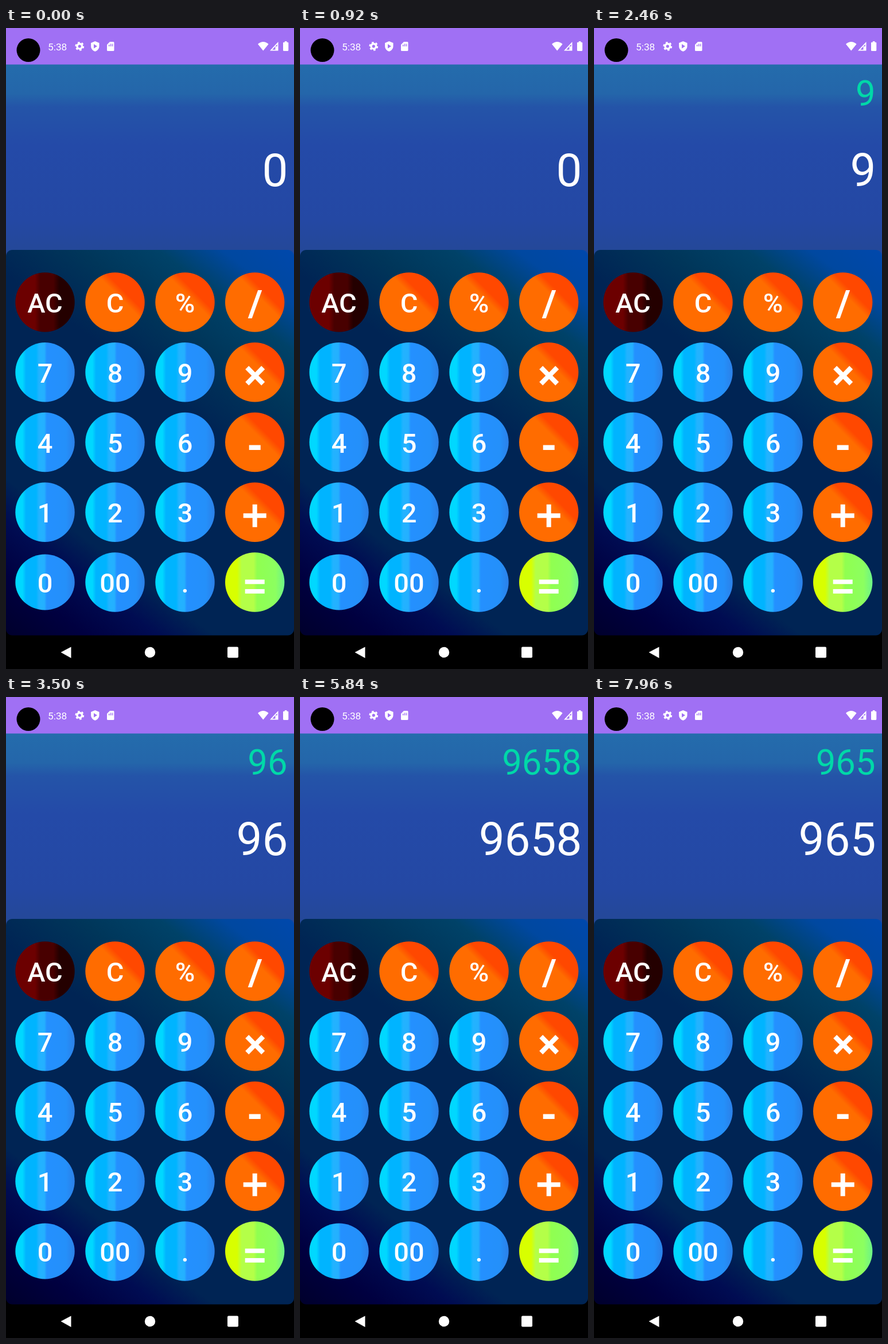
An HTML page for the animation above (8000 ms loop, 502x1115 px).

```html
<!DOCTYPE html>
<html lang="en">
<head>
<meta charset="utf-8">
<title>Calculator</title>
<style>
  html, body { margin: 0; width: 100%; height: 100%; overflow: hidden; background: #000; }
  svg { display: block; width: 100%; height: 100%; }
  text { font-family: Roboto, sans-serif; fill: #fff; }
  .key { font-size: 47px; font-weight: 500; text-anchor: middle; }
  .entry { font-size: 80px; text-anchor: end; }
  .result { font-size: 61.5px; text-anchor: end; fill: #00d8a8; }
</style>
</head>
<body>
<svg viewBox="0 0 502 1115">
  <defs>
    <linearGradient id="screen" x2="0" y2="1">
      <stop stop-color="#246cac"/>
      <stop offset=".15" stop-color="#2466aa"/>
      <stop offset=".22" stop-color="#2454a8"/>
      <stop offset=".42" stop-color="#244aa8"/>
      <stop offset=".8" stop-color="#2448a4"/>
      <stop offset="1" stop-color="#244896"/>
    </linearGradient>
    <linearGradient id="pad" gradientUnits="userSpaceOnUse" x1="0" y1="1056" x2="502" y2="386">
      <stop stop-color="#00002c"/>
      <stop offset=".1" stop-color="#000040"/>
      <stop offset=".19" stop-color="#000c52"/>
      <stop offset=".26" stop-color="#002454"/>
      <stop offset=".6" stop-color="#002454"/>
      <stop offset=".73" stop-color="#00365a"/>
      <stop offset=".83" stop-color="#004268"/>
      <stop offset=".91" stop-color="#0048a0"/>
      <stop offset="1" stop-color="#0048ac"/>
    </linearGradient>
    <linearGradient id="blue">
      <stop offset=".12" stop-color="#00d8ff"/>
      <stop offset=".18" stop-color="#00b4ff"/>
      <stop offset=".35" stop-color="#00b4ff"/>
      <stop offset=".4" stop-color="#22b3ff"/>
      <stop offset=".49" stop-color="#24b0ff"/>
      <stop offset=".53" stop-color="#2490ff"/>
      <stop offset=".85" stop-color="#2490fa"/>
      <stop offset="1" stop-color="#2c80e8"/>
    </linearGradient>
    <linearGradient id="orange" y1="1" x2="1" y2="0">
      <stop offset=".58" stop-color="#ff6c00"/>
      <stop offset=".67" stop-color="#ff4800"/>
    </linearGradient>
    <linearGradient id="red">
      <stop offset=".33" stop-color="#6c0000"/>
      <stop offset=".42" stop-color="#480000"/>
      <stop offset=".64" stop-color="#480000"/>
      <stop offset=".74" stop-color="#240000"/>
    </linearGradient>
    <linearGradient id="lime">
      <stop offset=".2" stop-color="#d8ff00"/>
      <stop offset=".28" stop-color="#b4ff48"/>
      <stop offset=".48" stop-color="#b4ff48"/>
      <stop offset=".54" stop-color="#90ff50"/>
      <stop offset=".85" stop-color="#8cff60"/>
      <stop offset="1" stop-color="#6cf488"/>
    </linearGradient>
  </defs>

  <rect width="502" height="1115"/>
  <rect width="502" height="64" fill="#a070f4"/>
  <rect y="63.5" width="502" height="336" fill="url(#screen)"/>
  <rect y="386" width="502" height="670.5" rx="11" fill="url(#pad)"/>

  <!-- status bar -->
  <circle cx="39" cy="38.5" r="20.5"/>
  <text x="73" y="38.5" font-size="17.3">5:38</text>
  <g fill="none" stroke="#fff">
    <circle cx="128.3" cy="31.8" r="4.3" stroke-width="3.4"/>
    <circle cx="128.3" cy="31.8" r="6.6" stroke-width="2.6" stroke-dasharray="3.5 3.41"/>
  </g>
  <g fill="#fff" fill-rule="evenodd">
    <path d="M155.3 23l7.2 3v5.5c0 4.5-3 8-7.2 9.3-4.2-1.3-7.2-4.8-7.2-9.3V26zM153 28v7.6l6-3.8z"/>
    <path d="M181 24h6q1.5 0 1.5 1.5v13q0 1.5-1.5 1.5h-9.5q-1.5 0-1.5-1.5V29zM179 29v3h1.5v-3zm3-1.5v4.5h1.5v-4.5zm3 0v4.5h1.3v-4.5z"/>
    <path d="M439 28Q448.3 20 457.6 28L448.3 39.5z"/>
    <path d="M474.5 24v15.5H460zM472.7 28.5l-8.6 9.3h5.4v-5.8h3.2z"/>
    <path d="M492.3 26v12.5q0 1.5-1.5 1.5h-6.3q-1.5 0-1.5-1.5V26q0-1.3 1.5-1.3h1.4V23h3.5v1.7h1.4q1.5 0 1.5 1.3z"/>
  </g>

  <text id="result" class="result" x="490.5" y="134.5"></text>
  <text id="entry" class="entry" x="491.5" y="275"></text>
  <g id="keys"></g>

  <!-- navigation bar -->
  <g fill="#fff">
    <path d="M95.5 1086L113.5 1076.5V1096z"/>
    <circle cx="251" cy="1086" r="9.2"/>
    <rect x="386" y="1076.5" width="19" height="19" rx="2"/>
  </g>
</svg>
<script>
const LOOP = 8000;
const typed = [[0, '0'], [2280, '9'], [3000, '96'], [3960, '965'], [4480, '9658'], [7640, '965']];
const columns = [68, 190, 312, 433.7];
const rows = ['AC C % /', '7 8 9 ×', '4 5 6 -', '1 2 3 +', '0 00 . ='];

// Operator strokes, relative to the key centre
const operators = {
  '/': 'M5.5-21H12.5L-5 28H-12z',
  '×': 'M-16.5-5L-10.5-11L.5.2L11.5-11L17.5-5L6.5 6L17.5 17L11.5 23L.5 11.8L-10.5 23L-16.5 17L-5.5 6z',
  '-': 'M-10 5H10V13.500H-10z',
  '+': 'M-4-13.500H4V2H20V10H4V26H-4V10H-20V2H-4z',
  '=': 'M-17-4.500H17V3.200H-17zM-17 12H17V19.700H-17z'
};

const byId = id => document.getElementById(id);

function keyFill(label) {
  if (label === 'AC') return 'red';
  if (label === '=') return 'lime';
  return /[\d.]/.test(label) ? 'blue' : 'orange';
}

function key(label, column, row) {
  const height = label === '0' ? 48.5 : 51.7; // the zero key is slightly flat
  const face = operators[label]
    ? `<path d="${operators[label]}" fill="#fff"/>`
    : `<text class="key" y="18">${label}</text>`;
  return `<g transform="translate(${columns[column]} ${477 + row * 121.75})">
    <ellipse rx="51.7" ry="${height}" fill="url(#${keyFill(label)})"/>${face}</g>`;
}

byId('keys').innerHTML = rows
  .flatMap((line, row) => line.split(' ').map((label, column) => key(label, column, row)))
  .join('');

function render(time) {
  const value = typed.filter(([start]) => start <= time).pop()[1];
  byId('entry').textContent = value;
  byId('result').textContent = value === '0' ? '' : value;
}

const start = performance.now();
function tick() {
  render((performance.now() - start) % LOOP);
  requestAnimationFrame(tick);
}
tick();
</script>
</body>
</html>
```
